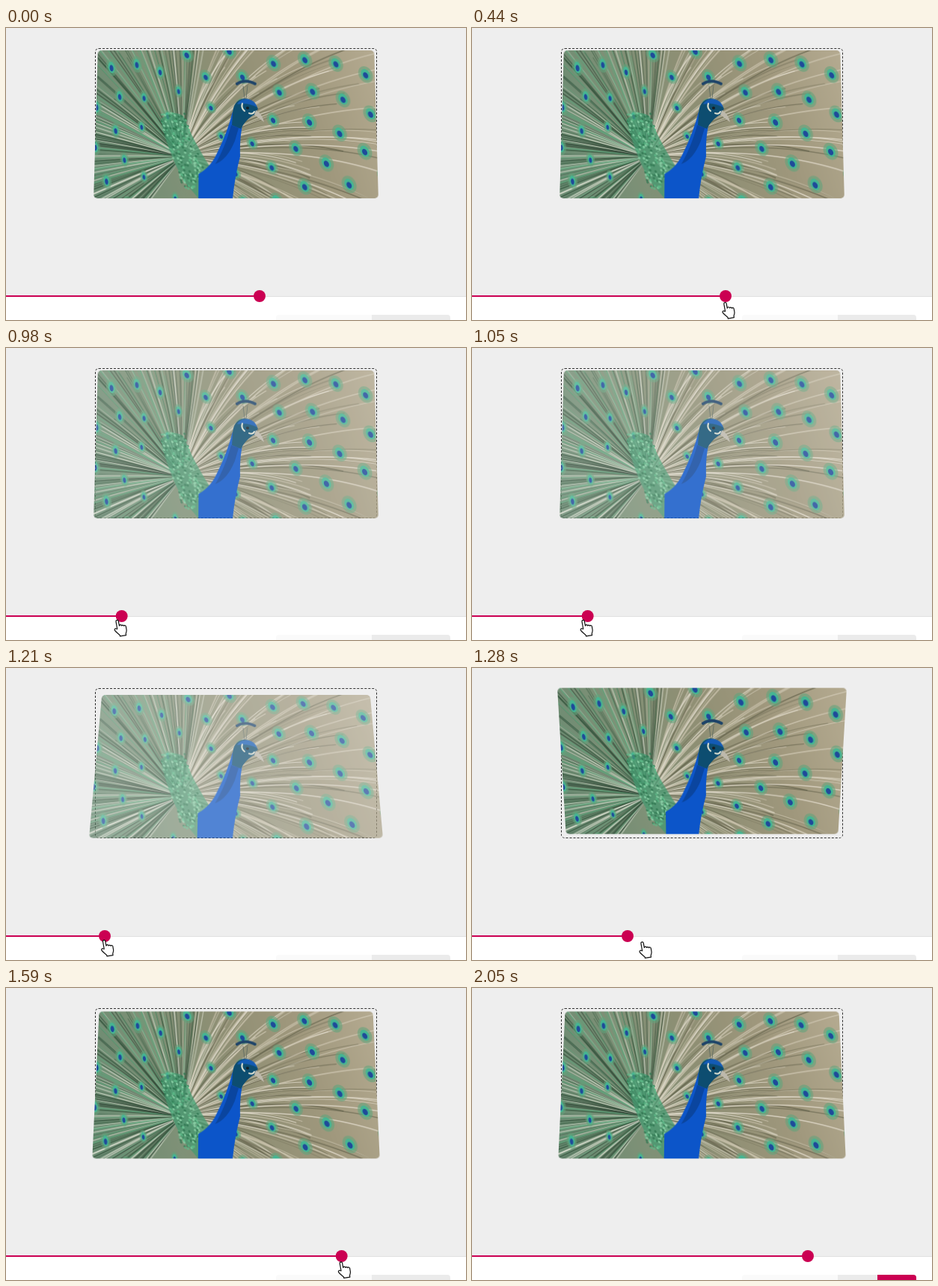
These frames come from a looping animation (615x391 px, 2.68 s). An HTML page with a canvas:

```html
<!DOCTYPE html>
<html lang="en">
<head>
<meta charset="utf-8">
<title>Timeline scrubbing</title>
<style>
  html, body { margin: 0; width: 100%; height: 100%; overflow: hidden; }
  body { position: relative; background: #eee; }
  body * { position: absolute; box-sizing: border-box; }
  #outline { left: 119px; top: 27px; width: 377px; height: 201px; border: 1px dashed #333; border-radius: 5px; }
  #scene { left: 120px; top: 28px; width: 375px; height: 199px; perspective: 600px; }
  #photo { left: 0; top: 0; width: 375px; height: 199px; border-radius: 5px; }
  #panel { left: 0; top: 359px; width: 615px; height: 32px; background: #fff; border-top: 1px solid #e0e0e0; }
  .key { top: 384px; height: 40px; border-radius: 0 4px 0 0; }
  #field { left: 361px; width: 128px; background: #fafafa; border-radius: 4px 0 0 0; }
  #button { left: 489px; width: 105px; background: #ebebeb; }
  #lit { left: 542px; width: 52px; background: #cb0052; }
  #track { left: 0; top: 358px; height: 2px; background: #cb0052; }
  #knob { left: -8px; top: 350.5px; width: 16px; height: 16px; border-radius: 50%; background: #cb0052; }
  #hand { left: 0; top: 0; overflow: visible; }
</style>
</head>
<body>
<div id="outline"></div>
<div id="scene"><canvas id="photo" width="750" height="398"></canvas></div>
<div id="panel"></div>
<div id="field" class="key"></div>
<div id="button" class="key"></div>
<div id="lit" class="key"></div>
<div id="track"></div>
<div id="knob"></div>
<svg id="hand" width="18" height="25">
  <path transform="rotate(-10 9 12)" fill="#fff" stroke="#111" stroke-width="1.2" stroke-linejoin="round"
        d="M4.5 13V3a1.7 1.7 0 0 1 3.4 0v6.2l.2-.2a1.6 1.6 0 0 1 3 .7a1.6 1.6 0 0 1 2.8.8a1.5 1.5 0 0 1 2.6 1.2v4.5c0 2-1.2 3.3-1.8 5v2h-8.2v-1.6C5 19.5 2.2 17 .9 14.2a1.5 1.5 0 0 1 2.4-1.7z"/>
</svg>

<script>
const $ = id => document.getElementById(id);
const mix = (a, b, p) => a + (b - a) * p;

// Simplified peacock illustration, drawn in stage coordinates.
const g = $('photo').getContext('2d');
g.scale(2, 2);
g.translate(-120, -28);
g.lineCap = 'round';

let seed = 7;
const rand = () => (seed = (seed * 16807) % 2147483647) / 2147483647;
const pick = list => list[Math.floor(rand() * list.length)];

function fill(path, color) {
  g.fillStyle = color;
  g.fill(new Path2D(path));
}
function stroke(path, color, width) {
  g.strokeStyle = color;
  g.lineWidth = width;
  g.stroke(new Path2D(path));
}
function oval(x, y, rx, ry, turn, color) {
  g.fillStyle = color;
  g.beginPath();
  g.ellipse(x, y, rx, ry, turn, 0, Math.PI * 2);
  g.fill();
}

function drawGround() {
  const tone = g.createLinearGradient(120, 170, 495, 60);
  ['#6a8b72', '#7f9177', '#8f8f74', '#a0987d', '#b3a98f']
    .forEach((color, i) => tone.addColorStop(i / 4, color));
  g.fillStyle = tone;
  g.fillRect(120, 28, 375, 199);
}

// Feather shafts fan out from behind the bird and droop on the right.
function drawShafts(count) {
  for (let i = 0; i < count; i++) {
    const a = Math.PI * mix(.7, 2.2, i / count) + rand() * .03;
    const right = Math.cos(a) > .2;
    const reach = mix(120, 340, rand()), bend = right ? .18 : -.03;
    const at = (r, turn) => `${236 + r * Math.cos(a + turn)} ${172 + r * Math.sin(a + turn)}`;
    const tones = right ? ['#ece6d8', '#67654e', '#d2cab5'] : ['#e6e8da', '#35593f', '#5fa57c', '#2d4634'];
    g.globalAlpha = mix(.4, .8, rand());
    stroke(`M${at(14, 0)}Q${at(reach * .6, 0)} ${at(reach, bend)}`, pick(tones), mix(.7, 1.9, rand()));
  }
  g.globalAlpha = 1;
}

// Eyespots follow a sunflower spiral, packed closer on the left.
function drawEyes(count) {
  for (let i = 5; i < count; i++) {
    const a = i * 2.39996, r = 23 * Math.sqrt(i);
    const left = Math.cos(a) < 0;
    const x = 240 + r * Math.cos(a) * (left ? .85 : 1.1);
    const y = 172 + r * Math.sin(a);
    const size = Math.min(1, .5 + r / 320);
    const turn = left ? -.2 : -.5, rx = size * (left ? 5.5 : 7);
    g.globalAlpha = .6;
    oval(x, y, rx * 1.3, size * 12, turn, '#63a47c');
    g.globalAlpha = 1;
    oval(x, y, rx * .8, size * 8, turn, '#46b592');
    oval(x, y + 1, rx * .45, size * 4.5, turn, '#1f4a9a');
  }
}

// Scaled back: small flecks along a slanted band.
function drawBack(count) {
  g.globalAlpha = .75;
  fill('M207 122Q222 108 237 118Q250 150 272 184L259 200V228L240 206Q216 166 207 122Z', '#459a70');
  for (let i = 0; i < count; i++) {
    const p = rand();
    const x = mix(221, 256, p) + (rand() - .5) * 36, y = mix(114, 215, p);
    oval(x, y, 1.8, 1.3, .8, pick(['#8fd6ab', '#5cba88', '#2d7550']));
  }
  g.globalAlpha = 1;
}

function drawBird() {
  fill('M303 112Q296 140 282 168Q274 186 258 195V228H303Q306 198 313 172Q312 143 318 123Z', '#0c55c9');
  fill('M301 130Q293 160 280 182Q296 176 306 151L311 134Z', '#0a459f');
  fill('M303 116Q303 97 318 94Q331 94 337 108L332 116Q321 122 314 135L302 130Z', '#0d4d70');
  fill('M309 102Q313 94 324 95Q333 97 336 106Q322 99 309 102Z', '#145bb5');
  fill('M334 110Q342 114 345 126L332 116Z', '#bdb9ac');
  stroke('M316 101q-2 6 3 10M325 114q5 2 7-2', '#e4e6d6', 2);
  oval(323, 107, 2, 1.8, 0, '#161b20');
  stroke('M319 94L317 77M321 94L323 77', '#55645d', .8);
  stroke('M309 74Q320 67 333 74', '#1e4469', 4);
}

drawGround();
drawShafts(240);
drawEyes(125);
drawBack(220);
drawBird();

// Key tilts in degrees along the playhead's track.
const tilts = [[132, 16], [166, 0], [225, -15], [289, 0], [405, 12.2], [449, 8.5]];
function tilt(x) {
  const n = Math.max(1, tilts.findIndex(([at]) => at >= x));
  const [x0, a0] = tilts[n - 1], [x1, a1] = tilts[n];
  return mix(a0, a1, (x - x0) / (x1 - x0));
}
const fade = x => Math.min(1, .7 + (x - 132) * .0055);

// Slow start, quick middle, soft stop.
const settle = (s, pace, power) => 1 - Math.exp(-((s / pace) ** power));

const LOOP = 2680, HOME = 339, LOW = 132, HIGH = 449;
const LEAD = .15, GRIP = -5.5; // pointer ahead of the playhead, in ticks and pixels

function drag(from, to, pace, power, py) {
  const place = s => mix(from, to, settle(s, pace, power));
  return s => ({ x: place(s), px: place(s + LEAD) + GRIP, py });
}

// Each move runs in even ticks from start to end, then holds.
const moves = [
  { start: 0, end: 0, ticks: 1, pose: () => ({ x: HOME, px: HOME, py: 395 }) },
  { start: 130, end: 590, ticks: 7, pose: s => {
    const rest = (1 - s / 7) ** 2;
    return { x: HOME, px: 333 + 10 * rest, py: 363 + 32 * rest };
  } },
  { start: 740, end: 1210, ticks: 7, pose: drag(HOME, LOW, 3.07, 3, 362.5) },
  { start: 1280, end: 1590, ticks: 5, pose: drag(LOW, HIGH, 1.91, 2, 365) },
  { start: 1900, end: 2050, ticks: 3, pose: s => ({ x: HIGH, px: HIGH + GRIP + 12 * s, py: 365 + 10 * s, lit: s === 3 }) }
];

function poseAt(t) {
  const { start, end, ticks, pose } = moves.filter(m => m.start <= t).pop();
  const tick = (end - start) / (ticks - 1) || LOOP;
  return pose(Math.min(ticks, 1 + Math.floor((t - start) / tick + 1e-6)));
}

function draw(t) {
  const { x, px, py, lit } = poseAt(t);
  $('photo').style.transform = `rotateX(${tilt(x)}deg)`;
  $('photo').style.opacity = fade(x);
  $('track').style.width = x + 'px';
  $('knob').style.transform = `translateX(${x}px)`;
  $('hand').style.transform = `translate(${px}px, ${py}px)`;
  $('lit').style.visibility = lit ? 'visible' : 'hidden';
}

const begin = performance.now();
function frame() {
  draw((performance.now() - begin) % LOOP);
  requestAnimationFrame(frame);
}
frame();
</script>
</body>
</html>
```
